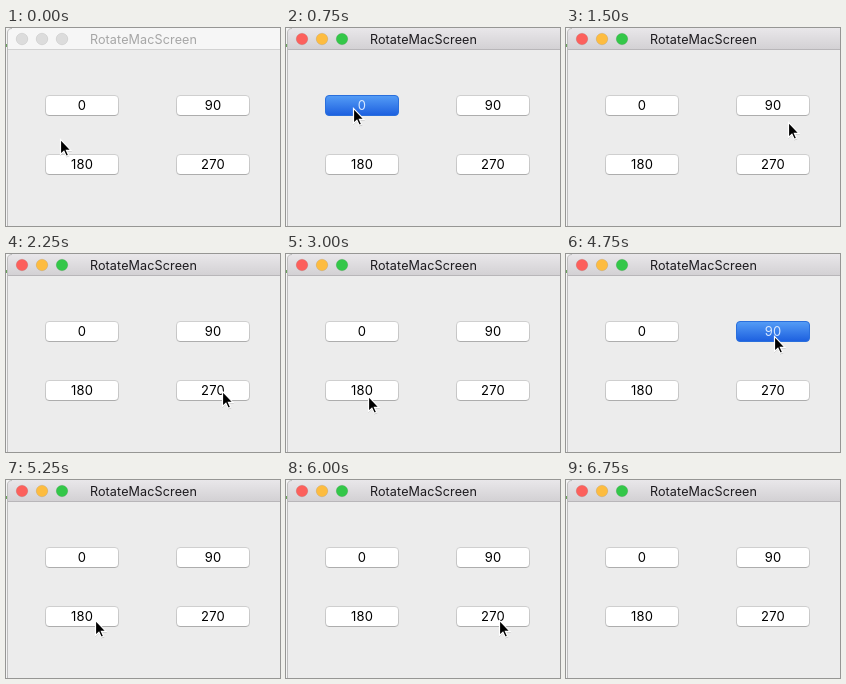
Write an HTML page that moves like this. It is 274 px wide and 198 px high and loops after 7500 ms.

```html
<!DOCTYPE html>
<html lang="en">
<head>
<meta charset="utf-8">
<title>RotateMacScreen</title>
<style>
  html, body { margin: 0; width: 100%; height: 100%; overflow: hidden; background: #ececec; }
  svg { display: block; width: 274px; height: 198px; }
  text { font: 13px Inter, Roboto, sans-serif; letter-spacing: .2px; text-anchor: middle; fill: #000; }
  .title { font-size: 12.6px; letter-spacing: .1px; fill: #1c1a1e; }
  .light { stroke-width: .6; stroke: #0002; }
  .face { fill: #fff; stroke: url(#edge); }
  .pressed .face { fill: url(#blue); stroke: #2a6fdc; }
  .pressed text { fill: #d8e8ff; }
  .inactive .bar { fill: #f6f6f6; }
  .inactive .rule { fill: #d2d2d2; }
  .inactive .title { fill: #a6a6a6; }
  .inactive .light { fill: #dcdcdc; }
</style>
</head>
<body>
<svg id="stage" viewBox="0 0 274 198">
  <defs>
    <linearGradient id="chrome" x2="0" y2="1">
      <stop stop-color="#e9e7ea"/><stop offset="1" stop-color="#d3d1d4"/>
    </linearGradient>
    <linearGradient id="blue" x2="0" y2="1">
      <stop stop-color="#559df6"/><stop offset="1" stop-color="#1c5fdf"/>
    </linearGradient>
    <linearGradient id="edge" x2="0" y2="1">
      <stop stop-color="#cfcfcf"/><stop offset=".85" stop-color="#c4c4c4"/><stop offset="1" stop-color="#adadad"/>
    </linearGradient>
  </defs>
  <rect width="274" height="198" fill="#ececec"/>
  <rect class="bar" width="274" height="21" fill="url(#chrome)"/>
  <rect class="rule" y="21" width="274" height="1" fill="#b8b6b9"/>
  <path d="M0 0H6Q2 1 2 5V198H0Z" fill="#f4f4f4"/>
  <path d="M6 .5Q1.5 .5 1.5 5V198" fill="none" stroke="#bdbdbd"/>
  <rect y="16" width="1" height="3" fill="#6aa35c"/>
  <text class="title" x="137.5" y="16">RotateMacScreen</text>
  <g id="lights"></g>
  <g id="buttons"></g>
  <g id="cursor">
    <path d="M0 1V17L4 13.6L6.3 18.6L9.4 17.3L7.2 12.4H12Z" fill="#000" opacity=".18"/>
    <path d="M.5 .4V15.4L3.9 12.3L6.2 17.3L8.6 16.3L6.4 11.3H11Z" fill="#000" stroke="#fff" stroke-width="1.2"/>
  </g>
</svg>
<script>
const byId = id => document.getElementById(id);
const stage = byId('stage'), cursor = byId('cursor');

byId('lights').innerHTML = ['#fc605c', '#fdbc40', '#34c749']
  .map((fill, i) => `<circle class="light" cx="${16 + 20 * i}" cy="11" r="5.8" fill="${fill}"/>`).join('');

byId('buttons').innerHTML = [0, 90, 180, 270].map((label, i) => {
  const x = 39 + 131 * (i % 2), y = 67 + 59 * (i >> 1);
  return `<g id="b${label}">
    <rect class="face" x="${x + .5}" y="${y + .5}" width="73" height="20" rx="3.5"/>
    <text x="${x + 37}" y="${y + 15}">${label}</text></g>`;
}).join('');

const STEP = 250, LOOP = 7500;

// Pointer stops; the pointer glides in a straight line between them.
const stops = [
  { t: 0, x: 54, y: 111 },
  { t: 500, x: 67, y: 80 },
  { t: 750, x: 67, y: 80 },
  { t: 1250, x: 214, y: 84 },
  { t: 1750, x: 229, y: 104 },
  { t: 2250, x: 216, y: 137 },
  { t: 2500, x: 204, y: 146 },
  { t: 3000, x: 82, y: 142 },
  { t: 3500, x: 82, y: 142 },
  { t: 4250, x: 81, y: 84 },
  { t: 4750, x: 208, y: 82 },
  { t: 5250, x: 89, y: 140 },
  { t: 6000, x: 213, y: 140 },
  { t: LOOP, x: 213, y: 140 }
];
const presses = { b0: 750, b90: 4750, b270: 6250 };

function pointerAt(t) {
  const next = stops.findIndex(stop => stop.t > t);
  const a = stops[next - 1], b = stops[next];
  const k = (t - a.t) / (b.t - a.t);
  return [a.x + (b.x - a.x) * k, a.y + (b.y - a.y) * k].map(Math.round);
}

function draw(time) {
  const t = Math.floor(time % LOOP / STEP) * STEP;
  cursor.setAttribute('transform', `translate(${pointerAt(t)})`);
  cursor.setAttribute('visibility', t < 6750 ? 'visible' : 'hidden');
  stage.classList.toggle('inactive', t < 500);
  for (const id in presses) byId(id).classList.toggle('pressed', t === presses[id]);
}

function tick() {
  draw(performance.now());
  requestAnimationFrame(tick);
}
tick();
</script>
</body>
</html>
```
